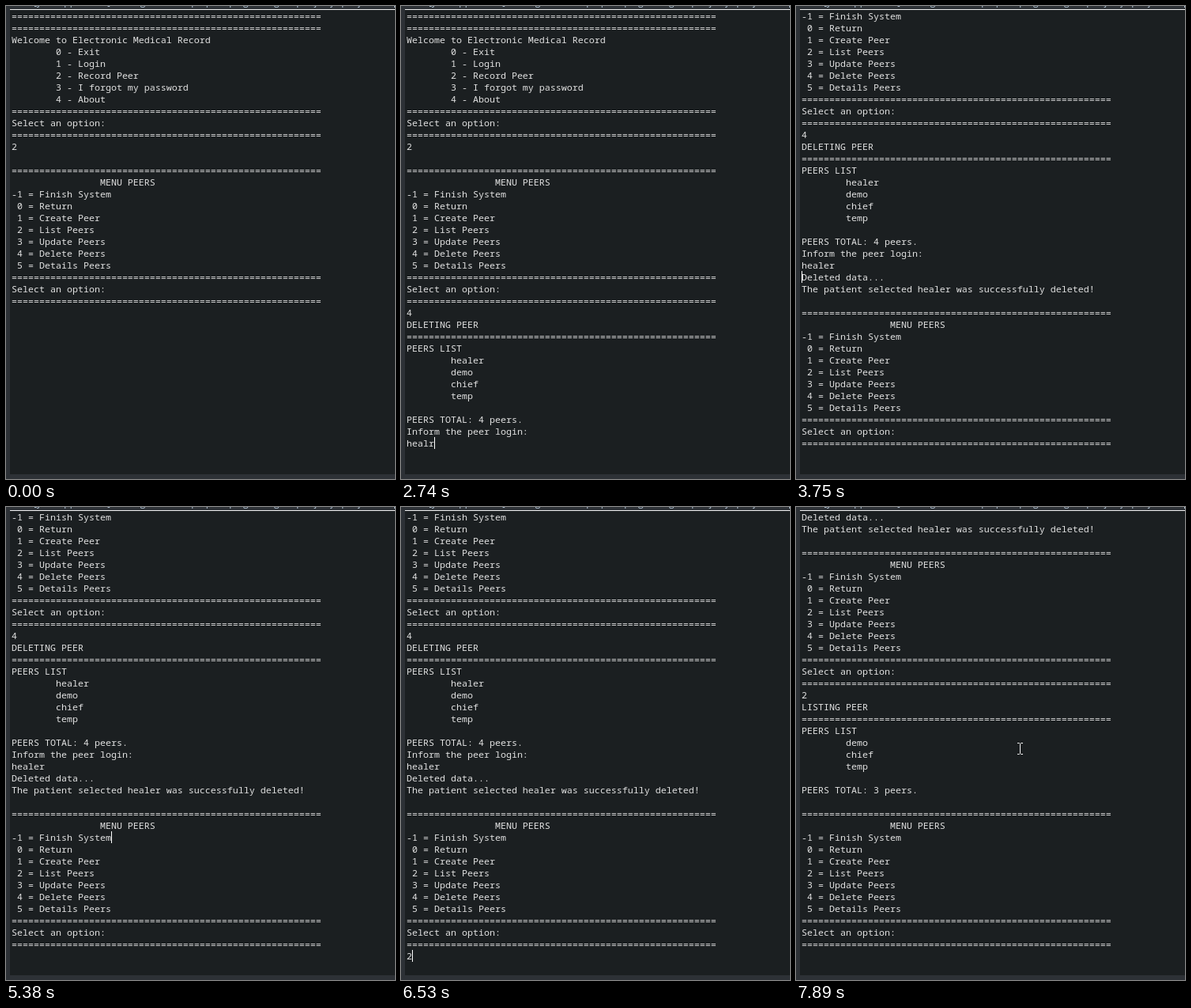
Write an HTML page that moves like this. It is 492 px wide and 598 px high and loops after 8000 ms.

```html
<!DOCTYPE html>
<html lang="en">
<head>
<meta charset="utf-8">
<title>Console session</title>
<style>
  html, body { margin: 0; width: 100%; height: 100%; overflow: hidden; background: #2d3136; }
  #stage { position: relative; width: 492px; height: 598px; overflow: hidden; }
  #path {
    position: absolute; left: 7px; top: 0; width: 485px; height: 4px; overflow: hidden;
    font: 12px/16px "Open Sans", sans-serif; color: #b9cbdc; white-space: pre;
  }
  #path span { position: absolute; left: 28px; top: -13px; }
  #rule { position: absolute; left: 5px; top: 4px; width: 487px; height: 1px; background: #f2f2f2; }
  #view { position: absolute; left: 5px; top: 5px; width: 487px; height: 587px; overflow: hidden; background: #1b1f21; }
  #text {
    position: absolute; left: 2px; top: 0; margin: 0;
    font: 11.667px/15px "Noto Sans Mono", "DejaVu Sans Mono", monospace;
    color: #e2e2e2; white-space: pre; font-variant-ligatures: none;
  }
  #caret { position: absolute; width: 1px; height: 15px; background: #fff; }
  #mouse { position: absolute; left: 0; top: 0; }
</style>
</head>
<body>
<div id="stage">
  <div id="path"><span>[Java Application] C:\Program Files\.p2\pool\plugins\org.eclipse.justj.openjdk.hotspot.jre.full</span></div>
  <div id="rule"></div>
  <div id="view"><pre id="text"></pre><div id="caret"></div></div>
  <svg id="mouse" width="9" height="17" fill="none">
    <path d="M1 1.5H3.5L4.5 2.5L5.5 1.5H8M4.5 2.5V14.5M1 15.5H3.5L4.5 14.5L5.5 15.5H8" stroke="#f4f4f4"/>
  </svg>
</div>
<script>
const LOOP = 8000, ROW = 15, COL = 7;
const bar = "=".repeat(56), tab = " ".repeat(8);
const indent = items => items.map(s => tab + s);
const prompt = [bar, "Select an option:", bar];
const menu = [
  bar, tab + tab + "MENU PEERS", "-1 = Finish System",
  ...["Return", "Create Peer", "List Peers", "Update Peers", "Delete Peers", "Details Peers"]
    .map((s, i) => ` ${i} = ${s}`),
  ...prompt
];
const logins = ["healer", "demo", "chief", "temp"];
const list = names => ["PEERS LIST", ...indent(names), "", `PEERS TOTAL: ${names.length} peers.`];

const log = [
  bar, bar, "Welcome to Electronic Medical Record",
  ...indent(["Exit", "Login", "Record Peer", "I forgot my password", "About"].map((s, i) => `${i} - ${s}`)),
  ...prompt, "2", "",
  ...menu, "4", "DELETING PEER", bar,
  ...list(logins), "Inform the peer login:", logins[0],
  "Deleted data...", `The patient selected ${logins[0]} was successfully deleted!`, "",
  ...menu, "2", "LISTING PEER", bar,
  ...list(logins.slice(1)), "",
  ...menu
];

// time, visible rows, scroll, caret row (-1 = hidden), caret column, text typed on the last row
const steps = [
  [0, 25, 0, -1, 0],
  [300, 25, 0, 12, 0],
  [610, 26, 0, 25, 1],
  [760, 28, 0, 26, 0],
  [910, 36, 0, 26, 0],
  [1380, 36, 0, -1, 0],
  [1840, 37, 0, 36, 1, "h"],
  [1990, 37, 0, 36, 2, "he"],
  [2120, 37, 0, 36, 3, "hea"],
  [2430, 37, 0, 36, 4, "heal"],
  [2740, 37, 0, 36, 5, "healr"],
  [3040, 37, 0, 36, 5, "heale"],
  [3190, 37, 0, 36, 6],
  [3600, 38, 0, 37, 0],
  [3750, 52, 225, 37, 0],
  [4180, 52, 225, -1, 0],
  [4790, 52, 225, 37, 0],
  [5230, 52, 225, -1, 0],
  [5380, 52, 225, 42, 18],
  [5680, 52, 214, 42, 18],
  [6250, 52, 214, -1, 0],
  [6530, 53, 225, 52, 1],
  [7000, 55, 240, 53, 0],
  [7150, 74, 555, 53, 0],
  [7590, 74, 555, -1, 0]
];
// time, x, y of the pointer
const pointer = [[0, -20, -20], [7740, 376, 330], [7890, 279, 297]];

const $ = id => document.getElementById(id);
const text = $("text"), caret = $("caret"), mouse = $("mouse");
const at = (table, t) => table.findLast(s => s[0] <= t);
let shown;

function draw(t) {
  const step = at(steps, t);
  if (step !== shown) {
    const [, rows, scroll, row, col, typed] = shown = step;
    const lines = log.slice(0, rows);
    if (typed) lines[rows - 1] = typed;
    text.textContent = lines.join("\n");
    text.style.top = -scroll + "px";
    caret.style.display = row < 0 ? "none" : "block";
    caret.style.left = 2 + col * COL + "px";
    caret.style.top = row * ROW - scroll + "px";
  }
  const [, x, y] = at(pointer, t);
  mouse.style.transform = `translate(${x}px, ${y}px)`;
}

const start = performance.now();
function tick() {
  draw((performance.now() - start) % LOOP);
  requestAnimationFrame(tick);
}
tick();
</script>
</body>
</html>
```
